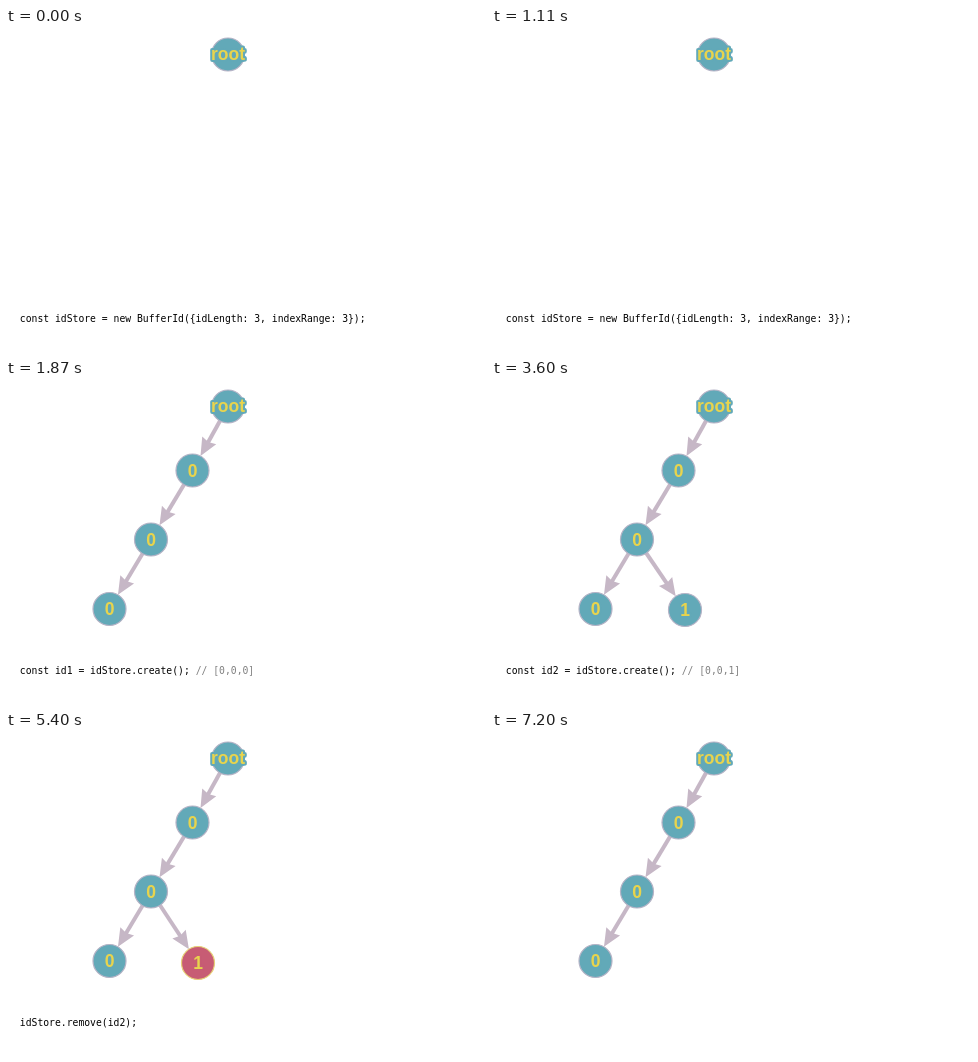
An HTML page that plays this animation: 480 px wide and 324 px high, repeating every 8 s.

```html
<!DOCTYPE html>
<html lang="en">
<head>
<meta charset="utf-8">
<title>Id tree</title>
<style>
html, body { margin: 0; width: 100%; height: 100%; overflow: hidden; background: #fff; }
svg { display: block; width: 480px; height: 324px; }
.edge { stroke: #c6b7c6; stroke-width: 4; }
.head { fill: #c6b7c6; }
.node circle { fill: #62a9b8; stroke: #b5b3c6; stroke-width: 1.2; }
.node text {
  font: bold 17.5px "Liberation Sans", Arial, sans-serif;
  text-anchor: middle; fill: #e8d44d;
  stroke: #62a9b8; stroke-width: 4; stroke-linejoin: round; paint-order: stroke;
}
.removed circle { fill: #c75c74; stroke: #e6d178; }
.removed text { stroke: #c75c74; }
.code { font: 9.74px "DejaVu Sans Mono", monospace; fill: #000; white-space: pre; }
.note { fill: #808080; }
</style>
</head>
<body>
<svg id="stage" viewBox="0 0 480 324"></svg>
<script>
const NS = "http://www.w3.org/2000/svg";
const stage = document.getElementById("stage");
const LOOP = 8000;

const path = [[222, 26.5, "root"], [186.5, 90.5, "0"], [145, 159.5, "0"], [103.5, 229, "0"]];
const added = [193, 230, "1"];
const removed = [192, 231, "1", "removed"];

const steps = [
  { at: 0, depth: 1, code: "const idStore = new BufferId({idLength: 3, indexRange: 3});" },
  { at: 1800, depth: 4, code: "const id1 = idStore.create(); ", note: "// [0,0,0]" },
  { at: 3600, depth: 4, extra: added, code: "const id2 = idStore.create(); ", note: "// [0,0,1]" },
  { at: 5400, depth: 4, extra: removed, code: "idStore.remove(id2);" },
  { at: 7200, depth: 4, code: "" }
];

function add(parent, tag, attrs, text) {
  const el = document.createElementNS(NS, tag);
  for (const key in attrs) el.setAttribute(key, attrs[key]);
  if (text) el.textContent = text;
  return parent.appendChild(el);
}

function drawEdge(parent, [x1, y1], [x2, y2]) {
  const len = Math.hypot(x2 - x1, y2 - y1);
  const angle = Math.atan2(y2 - y1, x2 - x1) * 180 / Math.PI;
  const g = add(parent, "g", { transform: `translate(${x1} ${y1}) rotate(${angle})` });
  const tip = len - 16.5;
  add(g, "line", { class: "edge", x2: tip - 14 });
  add(g, "path", { class: "head", d: `M${tip} 0l-18 -8l2 8l-2 8z` });
}

function drawNode(parent, [x, y, label, kind = ""]) {
  const g = add(parent, "g", { class: `node ${kind}`, transform: `translate(${x} ${y})` });
  add(g, "circle", { r: 16.5 });
  add(g, "text", { y: label === "root" ? 5.5 : 6 }, label);
}

function drawStep({ depth, extra, code, note }) {
  const g = add(stage, "g", { visibility: "hidden" });
  const nodes = path.slice(0, depth);
  nodes.slice(1).forEach((node, i) => drawEdge(g, nodes[i], node));
  if (extra) drawEdge(g, path[2], extra);
  nodes.forEach(node => drawNode(g, node));
  if (extra) drawNode(g, extra);
  const line = add(g, "text", { class: "code", x: 13.8, y: 294 });
  add(line, "tspan", {}, code);
  if (note) add(line, "tspan", { class: "note" }, note);
  return g;
}

const scenes = steps.map(drawStep);
const start = performance.now();

function show(now) {
  const t = Math.max(0, now - start) % LOOP;
  const current = steps.filter(step => step.at <= t).length - 1;
  scenes.forEach((scene, i) =>
    scene.setAttribute("visibility", i === current ? "visible" : "hidden"));
  requestAnimationFrame(show);
}
show(start);
</script>
</body>
</html>
```
